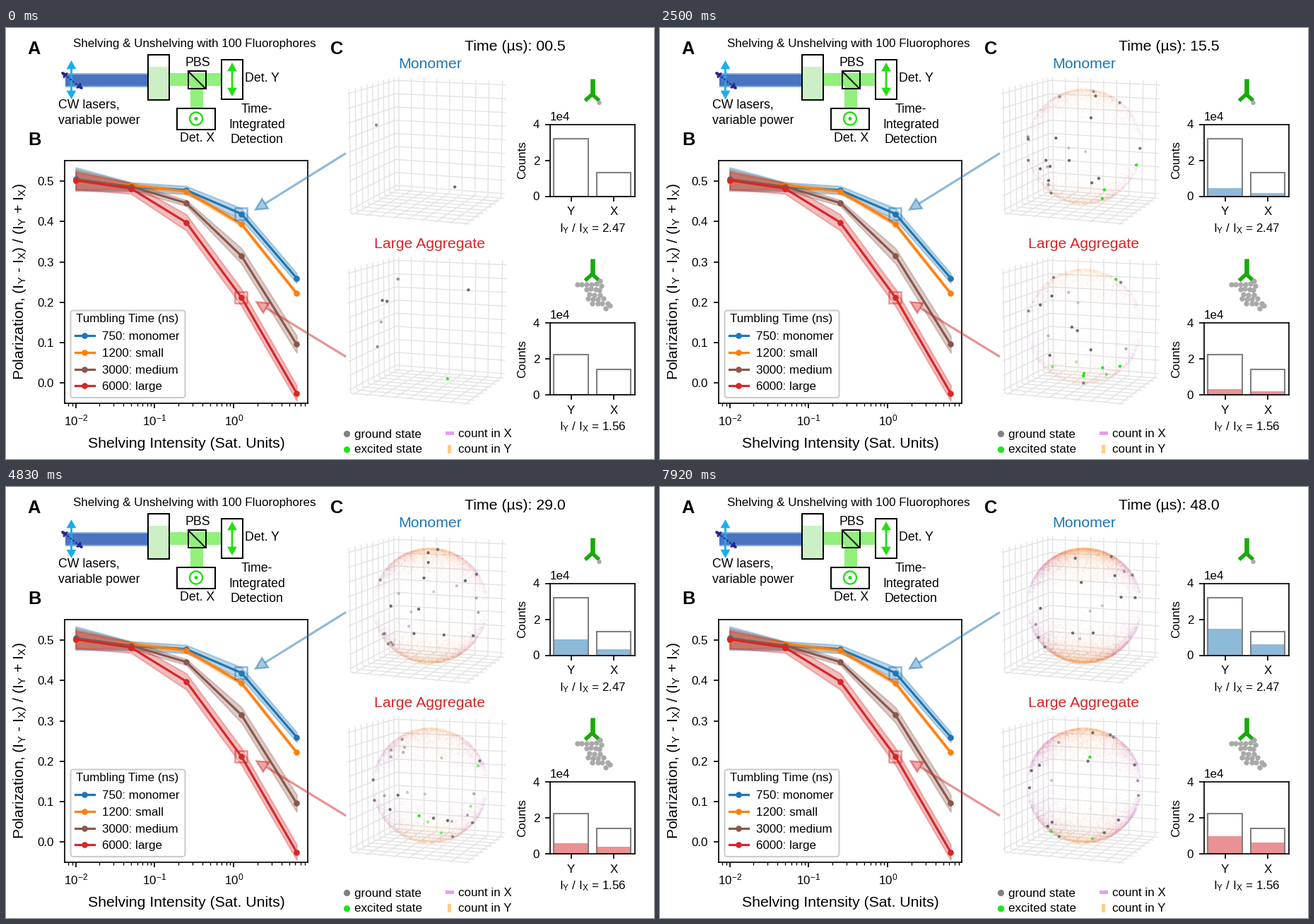
Recreate the animation shown at these times as a matplotlib script. Size 917 by 611 pixels, loop 8000 ms.

```python
import numpy as np
import matplotlib.pyplot as plt
from matplotlib.animation import FuncAnimation
from matplotlib.collections import LineCollection
from matplotlib.colors import to_rgb, to_rgba
from matplotlib.patches import (Circle, FancyArrowPatch, FancyBboxPatch,
                                Polygon, Rectangle)

W, H, DPI = 917, 611, 128
FRAMES, LOOP_MS = 96, 8000
BLUE, ORANGE, BROWN, RED = "#1f77b4", "#ff7f0e", "#8c564b", "#d62728"
VIOLET, AMBER = "#e49fee", "#fdcb8c"
GROUND, EXCITED = "#6c6c6c", "#1fe41a"
LASER_GREEN, SIGNAL_GREEN, ANTIBODY = "#92f07c", "#22e010", "#1ba80f"


def pt(px):
    return px * 72 / DPI


plt.rcParams.update({
    "font.family": "Liberation Sans",
    "font.size": pt(17),
    "axes.linewidth": pt(1.7),
    "mathtext.default": "regular",
})
for a in "xy":
    plt.rcParams.update({
        f"{a}tick.major.size": pt(7.4), f"{a}tick.major.width": pt(1.7),
        f"{a}tick.minor.size": pt(4.2), f"{a}tick.minor.width": pt(1.3),
        f"{a}tick.major.pad": pt(7.4),
    })

fig = plt.figure(figsize=(W / DPI, H / DPI), dpi=DPI, facecolor="white")


def axes_px(left, top, right, bottom):
    return fig.add_axes([left / W, 1 - bottom / H,
                         (right - left) / W, (bottom - top) / H])


# Overlay in pixel coordinates, y pointing down
stage = axes_px(0, 0, W, H)
stage.set(xlim=(0, W), ylim=(H, 0), zorder=5)
stage.axis("off")


def text(x, y, s, size=17, ha="left", **kw):
    return stage.text(x, y, s, fontsize=pt(size), ha=ha, va="baseline",
                      rotation_mode="anchor", zorder=6, **kw)


def rect(x0, y0, x1, y1, fill="none", edge="none", lw=0, z=2, **kw):
    stage.add_patch(Rectangle((x0, y0), x1 - x0, y1 - y0, facecolor=fill,
                              edgecolor=edge, linewidth=pt(lw), zorder=z, **kw))


def disc(x, y, r, fill, edge="none", lw=0, z=4):
    stage.add_patch(Circle((x, y), r, facecolor=fill, edgecolor=edge,
                           linewidth=pt(lw), zorder=z))


def line(xs, ys, color, lw, z=3, **kw):
    stage.plot(xs, ys, color=color, lw=pt(lw), zorder=z, **kw)


def double_arrow(a, b, color, lw, head, **kw):
    style = f"<|-|>,head_length={head[0]},head_width={head[1]}"
    stage.add_patch(FancyArrowPatch(
        a, b, arrowstyle=style, mutation_scale=pt(1), shrinkA=0, shrinkB=0,
        color=color, linewidth=pt(lw), joinstyle="miter", capstyle="butt",
        zorder=5, **kw))


def pointer(start, tip, color, length=16, half=8):
    """Translucent callout: a shaft and a paler outlined head."""
    start, tip = np.array(start, float), np.array(tip, float)
    along = (tip - start) / np.hypot(*(tip - start))
    base = tip - along * length
    side = half * np.array([-along[1], along[0]])
    line(*np.array([start, base]).T, color, 3.2, z=5, alpha=.5,
         solid_capstyle="butt")
    stage.add_patch(Polygon([tip, base + side, base - side],
                            facecolor=to_rgba(color, .4),
                            edgecolor=to_rgba(color, .5),
                            linewidth=pt(2.4), joinstyle="miter", zorder=5))


def optics():
    text(95, 26.5, "Shelving & Unshelving with 100 Fluorophores")
    rect(84, 64, 201, 84, "#86aee0")
    rect(84, 66, 201, 81.5, "#4a74c0")
    double_arrow((92.5, 46), (92.5, 101), "#17aef0", 2.8, (8, 4.5))
    double_arrow((77, 61.5), (110, 87.5), "#25268c", 1.8, (8, 4),
                 linestyle=(0, (1.6, 1.2)))
    rect(231, 64, 305, 82, LASER_GREEN)
    rect(261, 73, 279, 114, LASER_GREEN)
    rect(201, 38, 231, 102, "white", z=3)
    rect(202, 55, 230, 101, "#cdefc6", z=3)
    rect(201, 38, 231, 102, edge="black", lw=2, z=4)
    rect(257.5, 61, 282.5, 86, edge="black", lw=2, z=4)
    line([258, 282], [61.5, 85.5], "black", 2, z=4)
    rect(305, 45, 334.5, 101, "white", "black", 2, z=4)
    double_arrow((320, 49), (320, 97), SIGNAL_GREEN, 2.8, (8, 4.5))
    rect(242, 114, 296, 144, "white", "black", 2, z=4)
    disc(269, 128.5, 9, "none", SIGNAL_GREEN, 2.4, z=5)
    disc(269, 128.5, 2.6, SIGNAL_GREEN, z=5)
    size = 17.7
    text(271.5, 53.5, "PBS", size, "center")
    text(338, 76.5, "Det. Y", size)
    text(270.5, 161, "Det. X", size, "center")
    for y, s in ((120, "Time-"), (142, "Integrated"), (163, "Detection")):
        text(355, y, s, size, "center")
    text(74, 113.5, "CW lasers,", size)
    text(74, 135.5, "variable power", size)


def polarization():
    ax = axes_px(83, 188, 427, 531.5)
    ax.set_xscale("log")
    sat = 0.01 * 5.0 ** np.arange(5)
    series = [
        (BLUE, "750: monomer", [.505, .486, .478, .419, .260],
         [.029, .011, .010, .014, .012]),
        (ORANGE, "1200: small", [.500, .490, .475, .394, .222],
         [.022, .006, .005, .005, .004]),
        (BROWN, "3000: medium", [.504, .487, .446, .315, .096],
         [.025, .009, .007, .019, .021]),
        (RED, "6000: large", [.502, .482, .398, .212, -.025],
         [.022, .013, .020, .021, .019]),
    ]
    stage.add_patch(FancyBboxPatch(
        (91.5, 400.5), 162, 123.5, boxstyle="round,pad=0,rounding_size=4",
        facecolor="white", edgecolor="#cccccc", linewidth=pt(2.1), zorder=2))
    text(99, 417, "Tumbling Time (ns)")
    for i, (color, label, mean, err) in enumerate(series):
        mean, err = np.array(mean), np.array(err)
        ax.fill_between(sat, mean - err, mean + err, color=color, alpha=.3,
                        linewidth=pt(2.1))
        ax.plot(sat, mean, "o-", color=color, lw=pt(3.2), ms=pt(7.4),
                mew=pt(1.2))
        y = 436.3 + 23.7 * i
        line([97.5, 124.5], [y, y], color, 3.2)
        line([111], [y], color, 0, marker="o", ms=pt(7.4), mew=pt(1.2))
        text(136.5, y + 5.8, label)
    pad = np.log10(625) * .05
    ax.set(xlim=(10 ** (-2 - pad), 6.25 * 10 ** pad), ylim=(-.049, .551))
    ax.set_yticks(np.arange(6) / 10)
    text(255, 595, "Shelving Intensity (Sat. Units)", 21.2, "center")
    text(25, 360, "Polarization, (I$_Y$ - I$_X$) / (I$_Y$ + I$_X$)", 21.2,
         "center", rotation=90)
    for color, y, start, tip in ((BLUE, 263.5, (481, 177.5), (353, 257.5)),
                                 (RED, 381.8, (481, 466), (354.5, 388.5))):
        rect(324.3, y - 8.2, 340.7, y + 8.2, edge=color, lw=2.6, z=5, alpha=.5)
        pointer(start, tip, color)


# Camera: rows are right, up, towards the viewer
AZ, EL = np.radians([-70, 10])
CAMERA = np.array([
    [-np.sin(AZ), np.cos(AZ), 0],
    [-np.cos(AZ) * np.sin(EL), -np.sin(AZ) * np.sin(EL), np.cos(EL)],
    [np.cos(AZ) * np.cos(EL), np.sin(AZ) * np.cos(EL), np.sin(EL)],
])
CX, RADIUS, PERSPECTIVE = 599.5, 81, .0556


def unit(v):
    return v / np.linalg.norm(v, axis=-1, keepdims=True) \
        if False else v / np.linalg.norm(v, axis=-1)[..., None]


def project(points, cy):
    u, v, w = CAMERA @ np.asarray(points, float).T
    scale = RADIUS / (1 - PERSPECTIVE * w)
    return np.column_stack([CX + u * scale, cy - v * scale]), w


def unproject(seeds, cy):
    x, y, side = np.array(seeds, float).T
    u, v = (x - CX) / RADIUS, (cy - y) / RADIUS
    w = side * np.sqrt(np.clip(1 - u * u - v * v, 0, 1))
    return unit(np.column_stack([u, v, w])) @ CAMERA


def draw_box(cy, lim=1.07):
    a, b = -lim, lim
    segs = []
    for t in np.linspace(-1, 1, 9):
        for path in ([(t, a, a), (t, b, a), (t, b, b)],
                     [(b, t, a), (a, t, a), (a, t, b)],
                     [(a, a, t), (a, b, t), (b, b, t)]):
            segs.append(project(path, cy)[0])
    stage.add_collection(LineCollection(segs, colors="#e3e3e3",
                                        linewidths=pt(1.4), zorder=1))


def tumble(rng, seeds, cy, step, n=100):
    """Rotational diffusion with slow shelving; dots and colours per frame."""
    pos = unit(rng.normal(size=(n, 3)))
    pos[:len(seeds)] = unproject(seeds, cy)
    shown = np.arange(n) < len(seeds)
    lit = pos[:, 2] < -.8
    out = []
    for _ in range(FRAMES):
        xy, w = project(pos, cy)
        rgba = np.ones((n, 4))
        rgba[:, :3] = np.where(lit[:, None], to_rgb(EXCITED), to_rgb(GROUND))
        rgba[:, 3] = np.clip(.8 + .5 * w, .35, 1)
        order = np.argsort(w)
        order = order[shown[order]]
        out.append((xy[order], rgba[order]))
        z2 = pos[:, 2] ** 2
        chance = rng.random(n)
        shown = np.where(shown, chance > .02 + .2 * z2, chance < .026)
        kick = rng.normal(size=(n, 3)) * step
        kick -= pos * np.sum(kick * pos, axis=1)[:, None]
        pos = unit(pos + kick)
        lit = rng.random(n) < .55 * pos[:, 2] ** 2
    return out


def emission(rng, cy, axis, count, saturation):
    """Directions of detected photons, weighted by excitation and detector."""
    d = unit(rng.normal(size=(120000, 3)))
    z2 = d[:, 2] ** 2
    weight = z2 / (z2 + saturation) * d[:, axis] ** 2
    pick = rng.choice(len(d), count, p=weight / weight.sum())
    return project(d[pick], cy)[0]


def antibody(dy):
    line([829.5, 829.5], [72 + dy, 96 + dy], ANTIBODY, 6.6,
         solid_capstyle="butt")
    for x in (819.5, 839.5):
        line([829.5, x], [94 + dy, 103 + dy], ANTIBODY, 5.4,
             solid_capstyle="butt")


class Panel:
    def __init__(self, dy, bar_top, name, color, total, ratio, rate, seeds,
                 step, saturation, seed):
        rng = np.random.default_rng(seed)
        cy = 167.3 + dy
        self.rates = (rate, rate / ratio)
        text(600, 57 + dy, name, 21.2, "center", color=color)
        draw_box(cy)
        antibody(dy)
        self.clouds = []
        for axis, r, mark, tint in ((2, self.rates[0], "|", "#ffae4a"),
                                    (0, self.rates[1], "_", "#d675e8")):
            pts = emission(rng, cy, axis, int(r * 48), saturation)
            art, = stage.plot([], [], mark, color=tint, alpha=.035, ms=pt(3),
                              mew=pt(1.2), zorder=2)
            self.clouds.append((art, pts))
        self.dots = stage.scatter([], [], s=pt(4.3) ** 2, linewidths=0, zorder=4)
        self.states = tumble(rng, seeds, cy, step)

        ax = axes_px(770, bar_top, 889.5, bar_top + 102)
        self.bars = ax.bar([0, 1], [0, 0], color=color, alpha=.5)
        ax.bar([0, 1], [total, total / ratio], color="none",
               edgecolor="#808080", linewidth=pt(2.1))
        ax.set(xlim=(-.49, 1.49), ylim=(0, 4e4))
        ax.set_xticks([0, 1], ["Y", "X"])
        ax.set_yticks([0, 2e4, 4e4], ["0", "2", "4"])
        text(770, bar_top - 5.5, "1e4")
        text(735, bar_top + 51, "Counts", 17, "center", rotation=90)
        text(830, bar_top + 152.5, f"I$_Y$ / I$_X$ = {ratio}", 17, "center")

    def update(self, k, t):
        for bar, (art, pts), rate in zip(self.bars, self.clouds, self.rates):
            n = rate * max(t - 1.3, 0)
            bar.set_height(n)
            art.set_data(*pts[:int(n)].T)
        xy, rgba = self.states[k]
        self.dots.set_offsets(xy)
        self.dots.set_facecolors(rgba)


def key():
    disc(482.5, 575.5, 4.6, "#808080")
    disc(482.5, 597.8, 4.6, EXCITED)
    rect(622, 572, 634, 577, VIOLET)
    rect(625, 591, 630, 603, AMBER)
    for x, y, s in ((493, 580.5, "ground state"), (493, 602.5, "excited state"),
                    (640, 580.5, "count in X"), (640, 602.5, "count in Y")):
        text(x, y, s)


def aggregate():
    cluster = [(841, 359), (836, 363), (809, 364), (815, 364), (822, 364),
               (829, 364), (843, 366), (822, 371), (828, 370), (835, 371),
               (840, 372), (826, 378), (833, 379), (841, 379), (824, 384),
               (831, 385), (838, 385), (846, 384), (830, 391), (838, 391),
               (844, 391), (852, 391), (855, 394), (849, 398)]
    for x, y in cluster:
        disc(x, y, 3.7, "#a9a9a9")


for x, y, s in ((30, 37, "A"), (31, 165.5, "B"), (459.5, 37, "C")):
    text(x, y, s, 25.4, weight="bold")
optics()
polarization()
key()
disc(839.5, 106, 3.2, "#a9a9a9")
aggregate()
clock = text(649.3, 32, "", 21.2)

panels = [
    Panel(0, 136.5, "Monomer", BLUE, 32000, 2.47, 312,
          [(524, 137.5, -1), (634, 223.5, 1)], .47, .9, 4),
    Panel(255, 417.8, "Large Aggregate", RED, 22200, 1.56, 211,
          [(554.5, 355.5, -1), (534, 387, 1), (541, 388.5, 1), (653, 372.5, 1),
           (529, 416.5, -1), (525, 452, -1), (624.5, 496, 1)], .167, .25, 9),
]


def draw(k):
    t = .5 * (k + 1)
    clock.set_text(f"Time (µs): {t:04.1f}")
    for p in panels:
        p.update(k, t)
    return []


anim = FuncAnimation(fig, draw, frames=FRAMES, interval=LOOP_MS / FRAMES,
                     repeat=True, repeat_delay=0)
plt.show()
```
